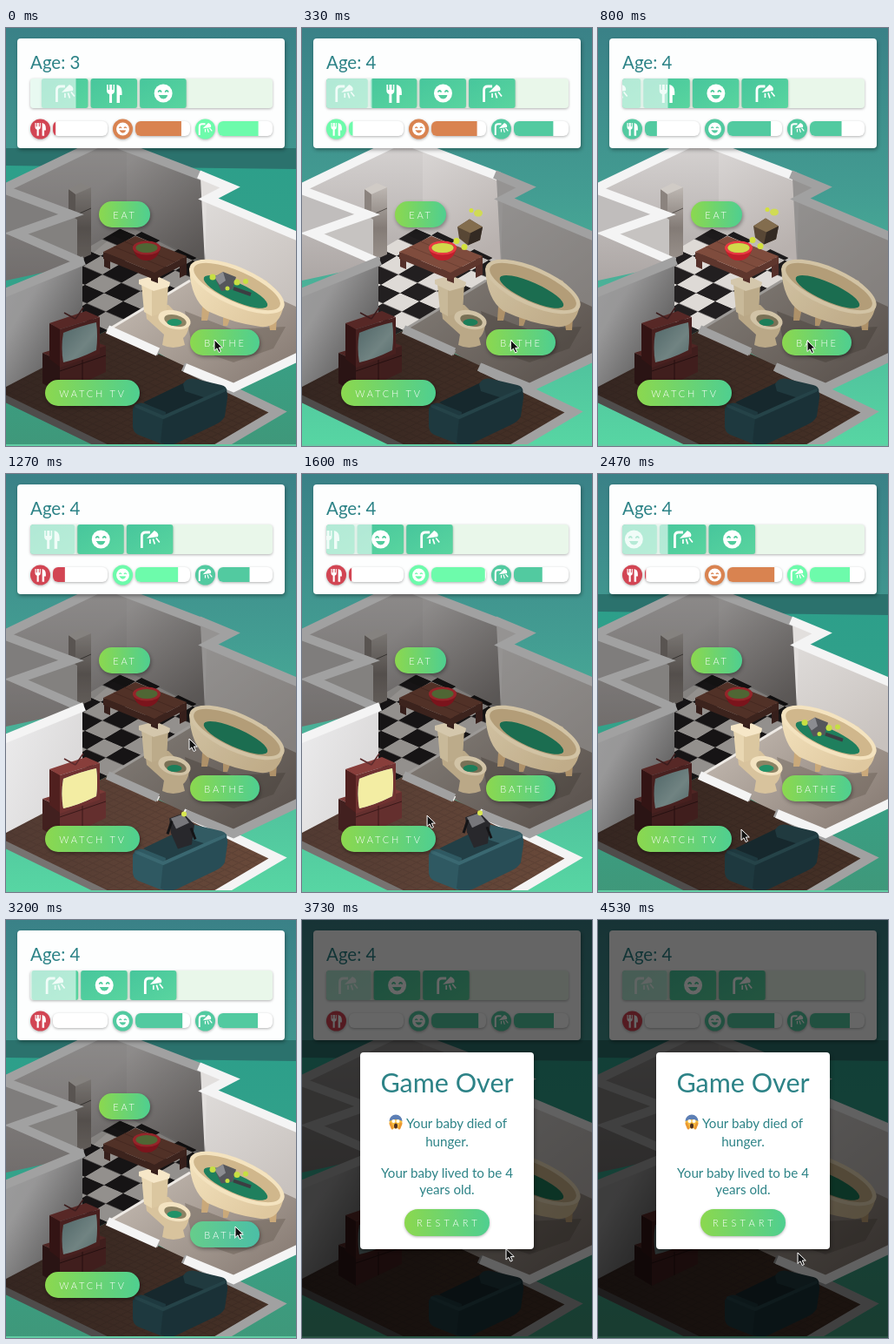
Animation, 334 px wide and 480 px high, one loop 4.59 s. Source, as an HTML page:

```html
<!DOCTYPE html>
<html lang="en">
<head>
<meta charset="utf-8">
<title>Baby game</title>
<style>
html, body { margin: 0; width: 100%; height: 100%; overflow: hidden; background: #3f968f; }
svg { display: block; font-family: Lato, sans-serif; }
.k, .b, .t { filter: brightness(.66); }
.prop.k, .prop.t { filter: brightness(.64); }
.prop.b { filter: brightness(.86); }
[data-room=k] .k, [data-room=b] .b, [data-room=t] .t { filter: none; }
.only { visibility: hidden; }
[data-room=k] .only.k, [data-room=b] .only.b, [data-room=t] .only.t { visibility: visible; }
[data-room=k] .k .shade, [data-room=t] .t .shade { visibility: hidden; }
.over .only.baby { visibility: hidden; }
.over .btn { display: none; }
.shadow { filter: drop-shadow(1px 2px 2px rgba(0,0,0,.35)); }
.soft { filter: drop-shadow(0 1px 1.5px rgba(0,0,0,.3)); }
.cap { fill: #fff; font-size: 11px; font-weight: 300; letter-spacing: 2.8px; text-anchor: middle; }
.band { fill: none; stroke: #f4f4f4; stroke-width: 10; stroke-linejoin: miter; }
.mid { text-anchor: middle; }
.teal { fill: #2d8387; }
</style>
</head>
<body>
<svg id="stage" width="334" height="480" viewBox="0 0 334 480" data-room="b">
<defs>
  <linearGradient id="sky" x2="0" y2="1"><stop stop-color="#3a8187"/><stop offset=".4" stop-color="#439d92"/><stop offset="1" stop-color="#57d6a3"/></linearGradient>
  <linearGradient id="glow" x2="0" y2="1"><stop stop-color="#2d9f8a"/><stop offset=".5" stop-color="#35a38a"/><stop offset="1" stop-color="#3f987a"/></linearGradient>
  <linearGradient id="lime"><stop stop-color="#8bd84f"/><stop offset="1" stop-color="#4fcf90"/></linearGradient>
  <linearGradient id="aqua"><stop stop-color="#66cd8b"/><stop offset="1" stop-color="#4bbfa6"/></linearGradient>
  <linearGradient id="task" x2="1" y2="1"><stop stop-color="#47c69c"/><stop offset="1" stop-color="#59d59f"/></linearGradient>
  <linearGradient id="wallL" x2="0" y2="1"><stop stop-color="#d8d5d4"/><stop offset="1" stop-color="#aca6a4"/></linearGradient>
  <linearGradient id="wallR" x2=".4" y2="1"><stop stop-color="#dad7d6"/><stop offset="1" stop-color="#b8b1ae"/></linearGradient>
  <linearGradient id="wallB" x2=".6" y2="1"><stop stop-color="#dedbd9"/><stop offset="1" stop-color="#c8c2be"/></linearGradient>
  <linearGradient id="wallT" x2="1" y2=".6"><stop stop-color="#ececed"/><stop offset="1" stop-color="#d9d7d7"/></linearGradient>
  <linearGradient id="dusk" x2="1" y2="1"><stop offset=".3" stop-opacity="0"/><stop offset="1" stop-opacity=".5"/></linearGradient>
  <linearGradient id="stone" x2="1" y2=".8"><stop stop-color="#cdc4bb"/><stop offset="1" stop-color="#897d75"/></linearGradient>
  <linearGradient id="steel" x2="0" y2="1"><stop stop-color="#bdb7b2"/><stop offset=".55" stop-color="#837b76"/><stop offset="1" stop-color="#9a928c"/></linearGradient>
  <linearGradient id="tub" x2="1" y2=".6"><stop stop-color="#f3e2bd"/><stop offset="1" stop-color="#dfc89f"/></linearGradient>
  <linearGradient id="tvOff" x2="1" y2="1"><stop stop-color="#7c9fa1"/><stop offset=".6" stop-color="#b0cdcb"/><stop offset="1" stop-color="#88a9a9"/></linearGradient>
  <linearGradient id="wood" x2="1" y2="0"><stop stop-color="#513a32"/><stop offset="1" stop-color="#6a4a3a"/></linearGradient>
  <pattern id="tiles" width="2" height="2" patternUnits="userSpaceOnUse" patternTransform="matrix(22 9.5 20 -11.8 117 347)">
    <path fill="#dedad6" d="M0 0h2v2H0z"/><path fill="#221f20" d="M0 0h1v1H0zM1 1h1v1H1z"/>
  </pattern>
  <pattern id="planks" width="8" height="8" patternUnits="userSpaceOnUse" patternTransform="matrix(1 .45 1 -.5 0 0)">
    <path stroke="#3f2c26" stroke-opacity=".3" d="M0 1H8M3 1V8"/>
  </pattern>
  <clipPath id="queueClip"><rect x="28" y="58" width="279" height="34" rx="4"/></clipPath>
  <symbol id="eat" viewBox="0 0 24 24"><path fill="#fff" d="M3.500 2v7q0 3 3 4V23h3V13q3-1 3-4V2H11v6H9.600V2H6.600v6H5.200V2zM15 2q6 1 6 8.500V14h-2.500v9H15z"/></symbol>
  <symbol id="smile" viewBox="0 0 24 24"><circle cx="12" cy="12" r="10.500" fill="#fff"/><g fill="none" stroke="currentColor" stroke-width="1.800" stroke-linecap="round"><path d="M6.500 10q1.500-2 3 0M14.500 10q1.500-2 3 0"/><path fill="currentColor" stroke-width="1" d="M7.500 14.500h9q-1 3.500-4.500 3.500t-4.500-3.500z"/></g></symbol>
  <symbol id="wash" viewBox="0 0 24 24"><path fill="none" stroke="#fff" stroke-width="2.800" d="M2.500 22V8.500Q2.500 4 7 4h5"/><path fill="#fff" d="M8 11 17 2q6 3 4 7z"/><path stroke="#fff" stroke-width="1.700" d="M12 12v5M15.500 11.500l2 6M19 10.500l4 5"/></symbol>
</defs>

<rect width="334" height="480" fill="url(#sky)"/>
<g class="only b"><path fill="#2b726d" d="M0 138H334V165H0z"/><path fill="url(#glow)" d="M0 158 334 162V480H0z"/></g>

<!-- kitchen -->
<g class="k">
  <path fill="url(#wallL)" d="M0 182 139 122V226L84 272 0 290z"/>
  <path fill="url(#wallR)" d="M139 134 236 172V276L139 226z"/>
  <path fill="url(#tiles)" d="M139 226 232 270 212 290 117 347 88 362V256z"/>
  <path fill="#000" opacity=".14" d="M139 226 232 270 222 282 122 238z"/>
  <path class="shade" fill="url(#dusk)" opacity=".6" d="M72 160 139 128V226L84 272zM139 134 236 172V276L139 226z"/>
  <path class="band" d="M-6 186 115 128 228 171"/>
</g>
<g class="prop k">
  <path fill="#8b837e" d="M72 185 80 190V268L72 262z"/>
  <path fill="#d0cbc6" d="M72 185 86 178 98 183 80 191z"/>
  <path fill="url(#steel)" d="M80 191 98 183V260L80 268z"/>
  <path stroke="#55504c" fill="none" d="M72 210 80 215 98 207"/>
</g>
<g class="k">
  <path fill="#c0bdbc" d="M0 186 72 213 10 236 0 238z"/>
  <path fill="#c6c3c1" d="M72 213 82 220V268L10 236z"/>
  <path class="band" d="M-6 184 75 214 12 236 88 269"/>
</g>

<!-- bathroom -->
<g class="b">
  <path fill="#e2dfdd" d="M224 172 260 184 235 197 229 270z"/>
  <path fill="url(#wallB)" d="M231 197 334 240V334L229 278z"/>
  <path fill="url(#stone)" d="M117 347 212 290 229 272 334 320V380L262 412 206 391 175 373z"/>
  <path fill="#63574f" opacity=".4" d="M206 325 260 346 322 343 308 368 262 384 215 368z"/>
  <path fill="none" stroke="#eeeae5" stroke-width="3" d="M117 347 212 290"/>
  <path class="band" d="M222 168 258 183 233 196 338 240"/>
</g>
<g class="prop b">
  <path fill="#caa97a" d="M226 320l9 2-3 14h-7zM302 334l10-3-1 16h-7zM250 332l8 2-3 8h-5z"/>
  <path fill="url(#tub)" d="M211 276Q213 312 232 325 262 339 293 343 315 345 320 318L300 290 230 270z"/>
  <g transform="rotate(24 266 297)">
    <ellipse cx="266" cy="297" rx="59" ry="22" fill="#f4e3bf"/>
    <ellipse cx="266" cy="297" rx="54" ry="17.500" fill="#d0b78c"/>
    <ellipse cx="267" cy="303" rx="40" ry="10.500" fill="#1f7f5d"/>
  </g>
  <path fill="#d8c39d" d="M160 318 187 318 211 342Q209 352 204 356L206 364Q192 370 180 364L182 352 162 334z"/>
  <path fill="#e9d7b2" d="M156 294 168 299V331L159 326z"/>
  <path fill="#dbc7a0" d="M168 299 187 293 185 326 168 331z"/>
  <path fill="#f6e7c8" d="M153 289 172 284 189 292 188 297 170 302 153 294z"/>
  <ellipse cx="194" cy="335" rx="19" ry="10.500" fill="#f3e3c1" transform="rotate(14 194 335)"/>
  <ellipse cx="195" cy="336" rx="13" ry="6.500" fill="#8d8364" transform="rotate(14 195 336)"/>
  <ellipse cx="194" cy="338" rx="8.500" ry="4" fill="#219268"/>
</g>

<!-- table and bowl -->
<g class="prop k">
  <path fill="#55302a" d="M113 258h7v19l-7-3zM167 278h8v15l-8-3zM200 264h8v19l-8 4z"/>
  <path fill="#5e362d" d="M112 257 171 281V289L112 265zM171 281 208 262V270L171 289z"/>
  <path fill="#7f4c3d" d="M112 257 149 239 208 262 171 281z"/>
  <path fill="none" stroke="#6c4033" d="M124 251 183 275M136 245 195 269"/>
  <path fill="#c01f2b" d="M146 253Q150 267 162 267T178 253z"/>
  <ellipse cx="162" cy="252.500" rx="16" ry="8" fill="#e83a42"/>
  <ellipse cx="162" cy="252.500" rx="12.500" ry="5.500" fill="#7ba052"/>
</g>
<ellipse class="only k" cx="162" cy="252.500" rx="12.500" ry="5.500" fill="#d3d84a"/>

<!-- living room -->
<g class="t">
  <path fill="url(#wood)" d="M0 402 88 362 117 347 214 392 312 440 262 472 240 480H118L0 424z"/>
  <path fill="url(#planks)" d="M0 402 88 362 117 347 214 392 312 440 262 472 240 480H118L0 424z"/>
  <path fill="url(#wallT)" d="M0 306 88 268V366L0 412z"/>
  <path class="shade" fill="url(#dusk)" d="M0 306 88 268V366L0 412z"/>
  <path class="band" d="M-6 306 90 267"/>
  <path fill="none" stroke="#777371" stroke-width="8" d="M-4 424 124 486"/>
  <path fill="none" stroke="#eceae7" stroke-width="6" d="M117 347 176 373"/>
  <path class="band" d="M204 389 313 441 240 484"/>
</g>
<g class="b"><path class="band" d="M117 346 175 372M206 390 262 413 338 377"/></g>
<g class="prop t">
  <path fill="#42201f" d="M42 373 62 382V420L42 408z"/>
  <path fill="#642f2e" d="M62 382 115 365V395L62 420z"/>
  <path fill="#7b3a37" d="M42 373 94 357 115 365 62 382z"/>
  <path fill="none" stroke="#3a1919" d="M62 394 115 376M88 375V408"/>
  <path fill="#50201f" d="M50 339 62 345V389L50 380z"/>
  <path fill="#883e3b" d="M50 339 92 325 108 332 62 346z"/>
  <path fill="#703231" d="M62 346 108 332V374L62 390z"/>
  <path fill="url(#tvOff)" d="M66 350Q86 342 104 338 106 354 104 370 84 380 66 384 63 367 66 350z"/>
  <path fill="none" stroke="#5c2b2c" stroke-width="1.500" d="M80 334 67 327M80 334 89 321"/>
</g>
<path class="only t" fill="#f3eda3" d="M66 350Q86 342 104 338 106 354 104 370 84 380 66 384 63 367 66 350z"/>
<g class="prop t">
  <path fill="#223f46" d="M158 430 206 407 242 420 190 447z"/>
  <path fill="#325b63" d="M204 409Q208 401 218 403L248 410Q256 412 254 420L240 428 206 417z"/>
</g>
<g class="only t baby"><g class="bob">
  <path fill="#28282c" d="M188 395 204 389 217 402 214 425 198 430 190 412z"/>
  <path fill="#77777b" d="M190 395 204 390 211 400 196 407z"/>
  <path stroke="#141416" stroke-width="3" d="M191 398 186 413M213 406 218 419"/>
  <circle cx="205" cy="390" r="3" fill="#d9e850"/>
</g></g>
<g class="prop t">
  <path fill="#2f5962" d="M146 437Q150 429 159 431L184 441 180 478 152 467Q146 464 146 457z"/>
  <path fill="#284d56" d="M181 447 250 414Q256 416 255 425L252 446Q249 452 240 456L196 477Q186 481 178 476z"/>
  <path fill="none" stroke="#3a6871" stroke-width="4" stroke-linecap="round" d="M150 434 181 447 251 416"/>
</g>

<g class="only k baby"><g class="bob">
  <path fill="#584735" d="M179 228 193 219 208 228 205 243 191 249 181 241z"/>
  <path fill="#836d4e" d="M179 228 193 219 208 228 194 235z"/>
  <path fill="#332a23" d="M194 235 208 228 205 243 191 249z"/>
  <g fill="#d3e23c"><circle cx="178" cy="244" r="3.500"/><circle cx="187" cy="251" r="3.500"/><circle cx="195" cy="209" r="2.500"/><ellipse cx="203" cy="212" rx="5" ry="4" opacity=".8"/></g>
</g></g>
<g class="only b baby"><g class="bob">
  <path fill="#55565b" d="M240 286 250 280 265 286 261 300 248 302z"/>
  <path fill="#8b8c91" d="M240 286 250 280 253 290 246 295z"/>
  <path stroke="#3c3d42" stroke-width="4" d="M262 299 282 306"/>
  <g fill="#c6df43"><circle cx="238" cy="286" r="3.500"/><circle cx="266" cy="292" r="3.500"/><circle cx="276" cy="291" r="3"/><circle cx="255" cy="299" r="2.500"/></g>
</g></g>
<rect y="478" width="334" height="2" fill="#62cda4"/>

<g id="buttons"></g>

<!-- status card -->
<rect class="shadow" x="13" y="12" width="308" height="126" rx="4" fill="#fdfefe"/>
<text id="age" class="teal" x="28" y="47" font-size="20.500"></text>
<rect class="soft" x="28" y="58" width="279" height="34" rx="4" fill="#e9f7ea"/>
<g clip-path="url(#queueClip)"><g id="queue"></g><rect x="28" y="58" width="52.500" height="34" fill="#e9faf4" opacity=".66"/></g>
<g id="meters"></g>

<g id="end" opacity="0">
  <rect width="334" height="480" opacity=".6"/>
  <rect class="shadow" x="67" y="152" width="200" height="226" rx="4" fill="#fff"/>
  <g class="teal mid" font-size="15.200">
    <text x="167" y="198" font-size="30.500">Game Over</text>
    <text x="178" y="239">Your baby died of</text>
    <text x="167" y="260">hunger.</text>
    <text x="167" y="296">Your baby lived to be 4</text>
    <text x="167" y="315">years old.</text>
  </g>
  <circle cx="108" cy="232" r="7.500" fill="#f6bd42"/>
  <path fill="#5d7fb5" d="M100.500 231a7.500 7.500 0 0 1 15 0q-7-4-15 0z"/>
  <g fill="#fff"><circle cx="105.500" cy="231" r="2"/><circle cx="110.500" cy="231" r="2"/></g>
  <ellipse cx="108" cy="236.500" rx="2" ry="3" fill="#4d3024"/>
  <path stroke="#eb9932" stroke-width="3" stroke-linecap="round" d="M102 234l2 5M114 234l-2 5"/>
  <rect class="soft" x="118" y="332" width="98" height="31" rx="15.500" fill="url(#lime)"/>
  <text class="cap" x="169" y="352" style="letter-spacing:4.200px">RESTART</text>
</g>
<path id="cursor" fill="#111" stroke="#fff" d="M0 0V12.500L3 9.800 5.200 14.500 7.400 13.500 5.300 9H9.300z"/>
</svg>

<script>
const LOOP = 4590, TURN = 265, END = 3265, PITCH = 56.6;
const GREEN = '#52caa0', BRIGHT = '#6dfbab', ORANGE = '#d98350', RED = '#d24553';
const $ = id => document.getElementById(id);

function add(parent, tag, attrs, text = '') {
  const el = document.createElementNS('http://www.w3.org/2000/svg', tag);
  for (const key in attrs) el.setAttribute(key, attrs[key]);
  el.textContent = text;
  return parent.appendChild(el);
}

const ease = u => u * u * (3 - 2 * u);
function tween(steps, t, col = 1) {
  const i = steps.findIndex(s => s[0] > t);
  if (i < 0) return steps[steps.length - 1][col];
  const a = steps[i - 1], b = steps[i];
  return a[col] + (b[col] - a[col]) * ease((t - a[0]) / (b[0] - a[0]));
}
const hold = (steps, t) => steps.filter(s => s[0] <= t).pop()[1];

// label, x, y, width, press times
const buttons = [
  ['EAT', 107, 199, 59, []],
  ['BATHE', 212, 346, 80, [130, 3130]],
  ['WATCH TV', 45, 404, 109, [2130]]
].map(([label, x, y, width, presses]) => {
  const g = add($('buttons'), 'g', { class: 'btn' });
  const box = add(g, 'rect', { class: 'shadow', x, y, width, height: 30, rx: 15 });
  add(g, 'text', { class: 'cap', x: x + width / 2 + .5, y: y + 20 }, label);
  return { box, presses };
});

// icon, time it joins the queue
const tasks = [['wash', 0], ['eat', 0], ['smile', 0], ['wash', 130], ['smile', 2130], ['wash', 3130]]
  .map(([icon, from]) => {
    const g = add($('queue'), 'g', { color: '#52cc9d' });
    add(g, 'rect', { class: 'soft', y: 58, width: 53.5, height: 34, rx: 3, fill: 'url(#task)' });
    add(g, 'use', { href: '#' + icon, x: 15, y: 63, width: 24, height: 24 });
    return { g, from };
  });

const meters = [
  { icon: 'eat', x: 54,
    level: [[0, 5], [265, 5], [565, 22], [1265, 22], [1565, 5], [2265, 5], [2460, 2], [3100, 2], [3200, 0]],
    tint: [[0, RED], [265, BRIGHT], [700, GREEN], [1265, RED]] },
  { icon: 'smile', x: 149,
    level: [[0, 84], [265, 84], [565, 80], [1265, 78], [1565, 98], [2265, 98], [2460, 86]],
    tint: [[0, ORANGE], [700, GREEN], [1265, BRIGHT], [2265, ORANGE], [2900, GREEN]] },
  { icon: 'wash', x: 244,
    level: [[0, 74], [265, 74], [565, 58], [1265, 58], [1565, 52], [2265, 52], [2460, 73]],
    tint: [[0, BRIGHT], [265, GREEN], [2265, BRIGHT], [2900, GREEN]] }
].map((m, i) => {
  const pill = { x: m.x, y: 107, width: 63, height: 17, rx: 6 };
  const g = add($('meters'), 'g', {});
  add(add(g, 'clipPath', { id: 'pill' + i }), 'rect', pill);
  add(g, 'rect', { ...pill, class: 'soft', fill: '#fff' });
  const fill = add(g, 'rect', { x: m.x, y: 107, height: 17, fill: 'currentColor', 'clip-path': `url(#pill${i})` });
  add(g, 'circle', { class: 'soft', cx: m.x - 14.5, cy: 116, r: 11.5, fill: 'currentColor' });
  add(g, 'use', { href: '#' + m.icon, x: m.x - 23, y: 107.5, width: 17, height: 17 });
  return { ...m, g, fill };
});

const pointer = [
  [0, 240, 358], [800, 241, 359], [1000, 241, 358], [1270, 211, 304], [1800, 113, 433], [2150, 113, 433],
  [2470, 165, 408], [3000, 262, 352], [3200, 264, 352], [3900, 230, 382]
];
const rooms = [[0, 'b'], [TURN, 'k'], [TURN + 1000, 't'], [TURN + 2000, 'b']];
const bobs = document.querySelectorAll('.bob');

function draw(t) {
  const live = Math.min(t, END), stage = $('stage');
  stage.dataset.room = hold(rooms, t);
  stage.classList.toggle('over', t >= END);
  $('age').textContent = 'Age: ' + (t < TURN ? 3 : 4);
  tasks.forEach(({ g, from }, k) => {
    g.setAttribute('transform', `translate(${41 + PITCH * (k - live / 1000)})`);
    g.style.display = t < from ? 'none' : '';
  });
  for (const m of meters) {
    m.g.setAttribute('color', hold(m.tint, t));
    m.fill.setAttribute('width', .63 * tween(m.level, t));
  }
  for (const { box, presses } of buttons) {
    const down = presses.some(p => t >= p && t < p + 170);
    box.setAttribute('fill', `url(#${down ? 'aqua' : 'lime'})`);
  }
  const bob = `translate(0 ${.7 * Math.sin(live / 150)})`;
  bobs.forEach(el => el.setAttribute('transform', bob));
  $('end').setAttribute('opacity', Math.max(0, Math.min(1, (t - END) / 250)));
  $('cursor').setAttribute('transform', `translate(${tween(pointer, t)} ${tween(pointer, t, 2)})`);
}

const start = performance.now();
function tick() {
  draw((performance.now() - start) % LOOP);
  requestAnimationFrame(tick);
}
tick();
</script>
</body>
</html>
```
